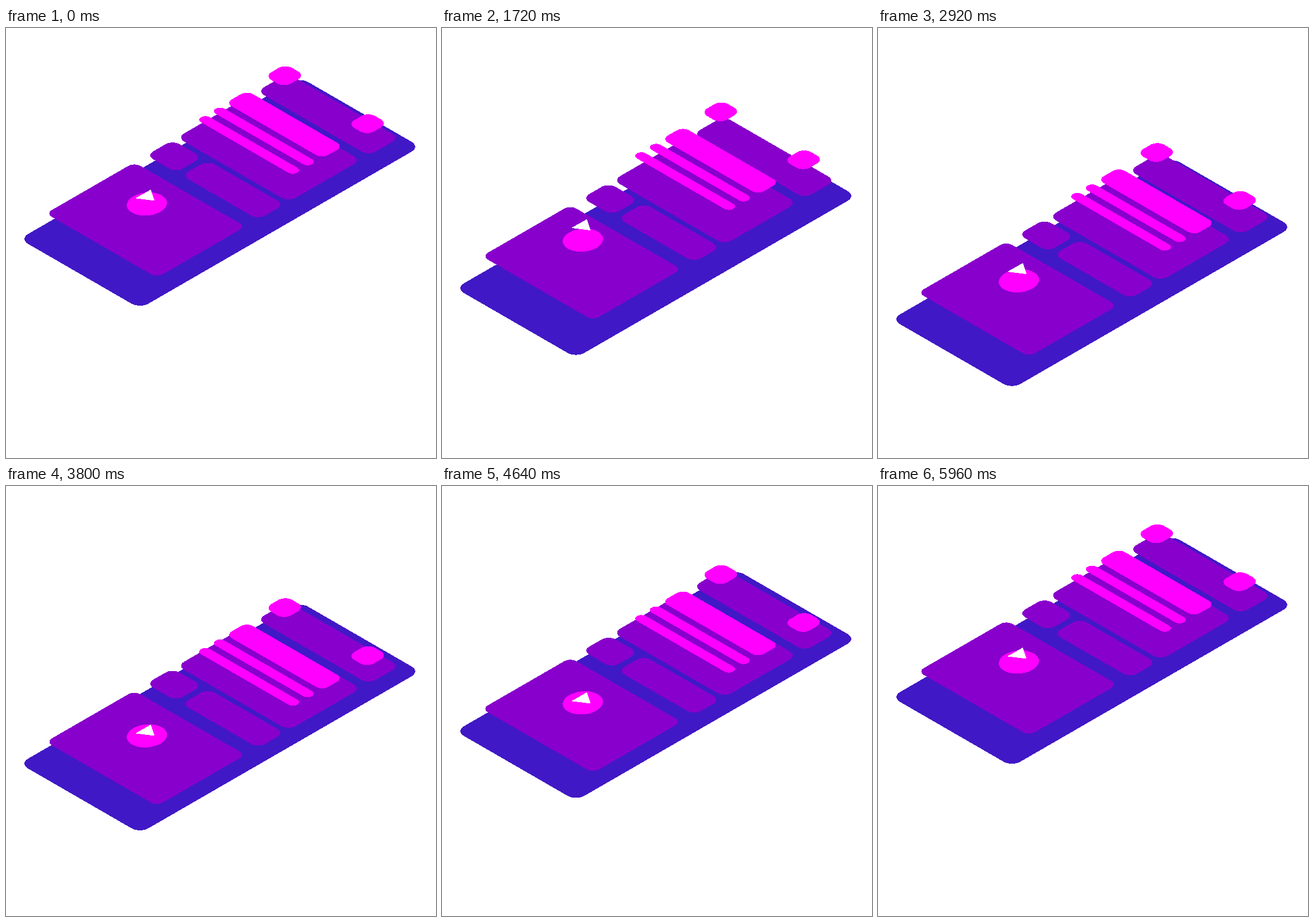
These frames come from a looping animation (748x748 px, 6 s). An HTML page:

```html
<!DOCTYPE html>
<html lang="en">
<head>
<meta charset="utf-8">
<title>Isometric layers</title>
<style>
  html, body { margin: 0; width: 100%; height: 100%; overflow: hidden; background: #fff; }
  svg { display: block; width: 100vw; height: 100vh; shape-rendering: crispEdges; }
  .base { fill: #4118c6; }
  .cards { fill: #8800cc; }
  .details { fill: #f0f; }
  .play { fill: #fff; }
</style>
</head>
<body>
<svg viewBox="0 0 748 748">
  <defs>
    <rect id="bar" x="351" width="193.4" height="17.7" rx="8.8"/>
    <rect id="chip" width="39.5" height="41.9" rx="14"/>
  </defs>
  <g class="layer base">
    <g class="iso"><rect x="380.5" y="-353.4" width="242" height="562.8" rx="17"/></g>
  </g>
  <g class="layer cards">
    <g class="iso">
      <rect x="362.7" y="-282.6" width="223.1" height="177.7" rx="12"/>
      <rect x="362.4" y="-80.6" width="59.6" height="52.8" rx="14"/>
      <rect x="433" y="-80" width="153.4" height="52.3" rx="14"/>
      <rect x="362.2" y="-18.6" width="224" height="145.2" rx="14"/>
      <rect x="362.2" y="142.3" width="224" height="61.7" rx="14"/>
    </g>
  </g>
  <g class="layer details">
    <g class="iso">
      <ellipse cx="447.7" cy="-164.7" rx="27.1" ry="30"/>
      <use href="#bar" y="31.8"/>
      <use href="#bar" y="61.4"/>
      <rect x="351" y="90.4" width="193.4" height="42.6" rx="12"/>
      <use href="#chip" x="343.3" y="176"/>
      <use href="#chip" x="510" y="175.8"/>
    </g>
  </g>
  <g class="layer play">
    <path d="M252 281 258.5 300.5 225 296.3Z"/>
  </g>
</svg>
<script>
  const LOOP = 6000, STEP = 40, HALF = 3000, END = 5985, LAG = 160, DROP = 140;
  const PAINT = 8; // ms from drawing to display
  const layers = [...document.querySelectorAll('.layer')];

  // x axis runs down-right, y axis runs up-right
  for (const g of document.querySelectorAll('.iso')) {
    g.setAttribute('transform', 'matrix(.866 .5 .866 -.5 0 0)');
  }

  // soft ease between a sine and a cubic
  function ease(p) {
    p = Math.min(1, Math.max(0, p));
    const sine = (1 - Math.cos(Math.PI * p)) / 2;
    const cubic = p * p * (3 - 2 * p);
    return (sine + cubic) / 2;
  }

  // each layer starts later, and all come back together
  function offset(t, lag) {
    const peak = HALF + lag;
    return DROP * (t < peak ? ease((t - lag) / HALF) : ease((END - t) / (END - peak)));
  }

  const start = performance.now();

  function draw() {
    const now = (performance.now() - start + PAINT) % LOOP;
    const t = Math.floor(now / STEP) * STEP;
    layers.forEach((layer, i) => {
      layer.setAttribute('transform', `translate(0 ${offset(t, i * LAG).toFixed(2)})`);
    });
    requestAnimationFrame(draw);
  }
  draw();
</script>
</body>
</html>
```
